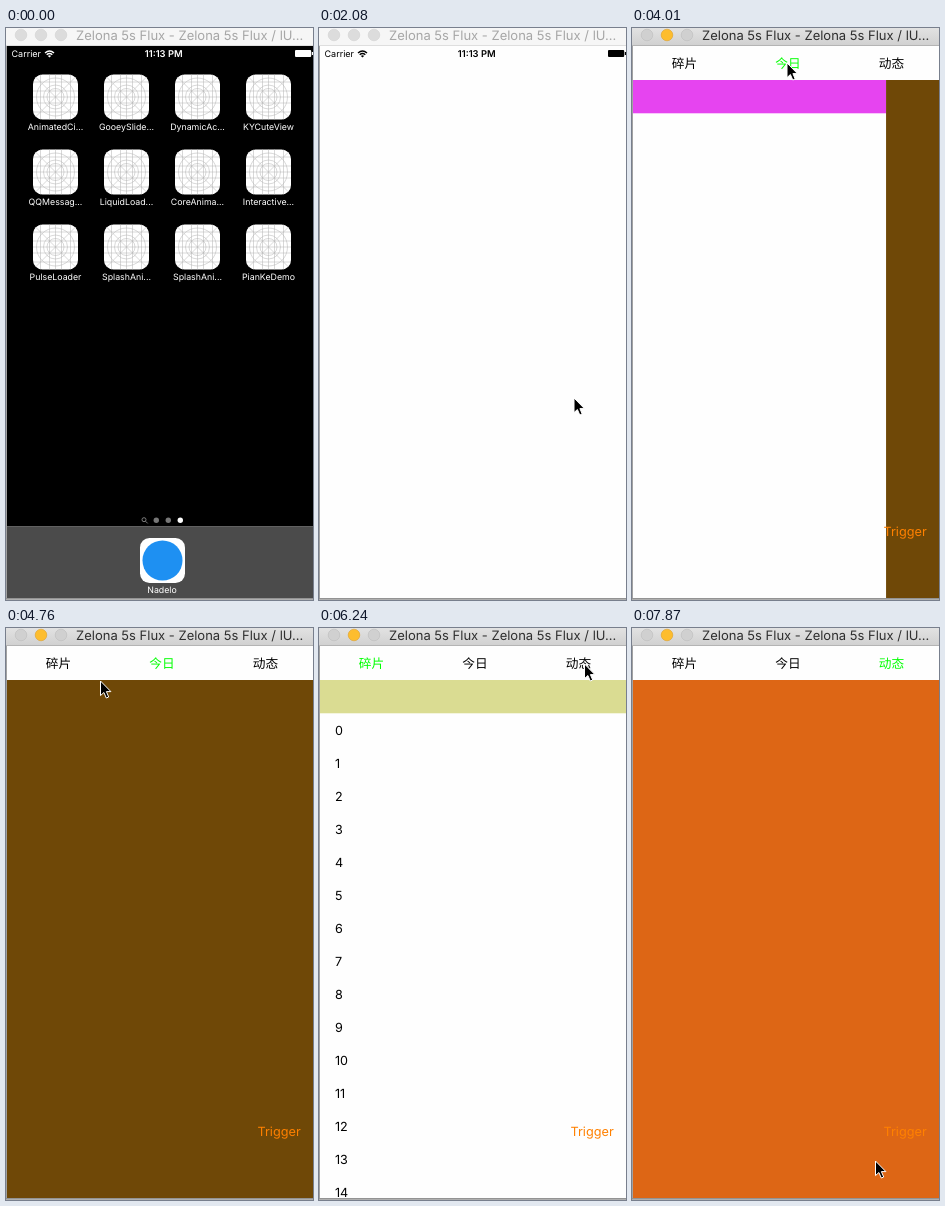
An HTML page for the animation above (8 s loop, 307 px wide and 572 px high).

```html
<!DOCTYPE html>
<html lang="zh-CN">
<head>
<meta charset="utf-8">
<style>
html, body { margin: 0; height: 100%; overflow: hidden; background: #fff }
svg { display: block; width: 307px; height: 572px; font-family: Inter, Roboto, sans-serif; text-rendering: geometricPrecision }
.tabs { font: 12.7px "Noto Sans CJK SC", "Noto Sans CJK", sans-serif }
.mid { text-anchor: middle }
</style>
</head>
<body>
<svg viewBox="0 0 307 572">
  <defs>
    <linearGradient id="bar" x2="0" y2="1"><stop stop-color="#e2e2e2"/><stop offset="1" stop-color="#d0d0d0"/></linearGradient>
    <linearGradient id="shade" x2="0" y2="1"><stop stop-color="#858585"/><stop offset="1" stop-color="#bdbdbd"/></linearGradient>
    <clipPath id="screen"><path d="M1 18H307V570H1Z"/></clipPath>
    <g id="tile">
      <rect width="45" height="45" rx="9.5" fill="#fff"/>
      <g fill="none" stroke="#b0b0b0" stroke-width=".5">
        <path d="M7.5 0V45M16.5 0V45M22.5 0V45M28.5 0V45M37.5 0V45M0 7.5H45M0 16.5H45M0 22.5H45M0 28.5H45M0 37.5H45M2.5 2.5L42.5 42.5M42.5 2.5L2.5 42.5"/>
        <circle cx="22.5" cy="22.5" r="19"/><circle cx="22.5" cy="22.5" r="12"/><circle cx="22.5" cy="22.5" r="8.5"/>
      </g>
    </g>
  </defs>
  <rect width="307" height="572" fill="#a2a2a2"/>
  <rect y="570" width="307" height="2" fill="url(#shade)"/>

  <g clip-path="url(#screen)">
    <g id="phone">
      <rect y="18" width="307" height="554"/>
      <g id="home">
        <g id="apps" class="mid" font-size="8.8" fill="#fff"></g>
        <g fill="none" stroke="#888" stroke-width=".9"><circle cx="138" cy="491.7" r="2"/><path d="M139.5 493.2L141.7 495.4"/></g>
        <g fill="#777"><circle cx="150.3" cy="492.3" r="2.7"/><circle cx="162.3" cy="492.3" r="2.7"/><circle cx="174.3" cy="492.3" r="2.7" fill="#fff"/></g>
        <rect y="498" width="308" height="74" fill="#4b4b4b"/>
        <rect y="498" width="308" height=".7" fill="#6a6a6a"/>
        <rect x="134" y="510" width="45" height="45" rx="9.5" fill="#fff"/>
        <circle cx="156.5" cy="532.5" r="20" fill="#1e90f2"/>
        <text class="mid" x="156" y="565" font-size="8.8" fill="#fff">Nadelo</text>
      </g>
      <rect id="launch" fill="#fefefe"/>
      <g id="status" fill="currentColor">
        <text x="5.5" y="29" font-size="9">Carrier</text>
        <g fill="none" stroke="currentColor" stroke-width="1.4"><path d="M39 24.9Q43.5 20.9 48 24.9M40.7 26.8Q43.5 24.4 46.3 26.8"/></g>
        <path d="M41.9 27.9Q43.5 26.7 45.1 27.9L43.5 29.5Z"/>
        <text class="mid" x="157.7" y="29" font-size="9.4" font-weight="600">11:13 PM</text>
        <rect x="289" y="22" width="16.2" height="7" rx="1"/><rect x="305.8" y="24" width="1.2" height="3"/>
      </g>
    </g>
    <g id="app">
      <rect y="18" width="307" height="554" fill="#fefefe"/>
      <g id="pages">
        <rect id="head" x="1" y="52" width="306" height="33.3"/>
        <g id="rows" font-size="12.6"></g>
        <rect x="307" y="52" width="306" height="520" fill="#6f4807"/>
        <rect x="613" y="52" width="306" height="520" fill="#dd6615"/>
      </g>
      <text x="251.5" y="508.3" font-size="12.7" fill="#ff8000">Trigger</text>
      <g id="tabs" class="tabs mid"><text x="52.5" y="39.8">碎片</text><text x="156" y="39.8">今日</text><text x="259.5" y="39.8">动态</text></g>
    </g>
  </g>

  <rect id="titleBar" width="307" height="18"/>
  <rect id="titleLine" y="17" width="307" height="1"/>
  <g id="lights" stroke-width=".6"><circle cx="15" cy="7" r="5.8"/><circle cx="35" cy="7" r="5.8"/><circle cx="55" cy="7" r="5.8"/></g>
  <text id="title" x="70" y="11.8" font-size="13">Zelona 5s Flux - Zelona 5s Flux / lU...</text>
  <path id="cursor" d="M0 -1V13.6L3.4 10.5L5.8 16L8.2 15L5.9 9.6H10.4Z" stroke="#fff" stroke-width="1"/>
</svg>
<script>
const LOOP = 8000, START = 1490, STEP = 148.4;
const $ = id => document.getElementById(id);
const set = (el, attrs) => { for (const a in attrs) el.setAttribute(a, attrs[a]); };
const show = (id, on) => set($(id), { visibility: on ? 'visible' : 'hidden' });
const lerp = (a, b, p) => a + (b - a) * p;

const names = ['AnimatedCi...', 'GooeySlide...', 'DynamicAc...', 'KYCuteView',
  'QQMessag...', 'LiquidLoad...', 'CoreAnima...', 'Interactive...',
  'PulseLoader', 'SplashAni...', 'SplashAni...', 'PianKeDemo'];
$('apps').innerHTML = names.map((name, i) => {
  const x = 27 + i % 4 * 71, y = 46.5 + (i >> 2) * 75;
  return `<use href="#tile" x="${x}" y="${y}"/><text x="${x + 22.5}" y="${y + 55}">${name}</text>`;
}).join('');
$('rows').innerHTML = Array.from({ length: 15 }, (_, i) =>
  `<text x="16" y="${106.6 + 33 * i}">${i}</text>`).join('');

// Pointer path: step, x, y
const path = [[4, 255, 371], [7, 228, 367], [8, 216, 332], [9, 196, 262], [10, 170, 190], [11, 145, 125],
  [12, 130, 76], [13, 140, 48], [14, 155, 36], [18, 155, 36], [20, 111, 72], [22, 94.5, 54], [24, 45, 38],
  [28, 45, 38], [32, 265.5, 37], [36, 265.5, 37], [40, 76, 120], [43, 243.5, 534]];

// Tab taps: step, tab
const taps = [[-1, 0], [17, 1], [26, 0], [34, 2]];
const glide = [.173, .88, 1];

function pointer(k) {
  const i = path.findIndex(p => p[0] > k);
  if (i < 0) return path[path.length - 1].slice(1);
  const a = path[Math.max(i - 1, 0)], b = path[i], p = Math.max(0, (k - a[0]) / (b[0] - a[0] || 1));
  return [lerp(a[1], b[1], p), lerp(a[2], b[2], p)];
}

function drawLaunch(k) {
  const u = k < 0 ? 0 : Math.min(1, (k + .262) / 4), p = u * u * (3 - 2 * u), s = 1 + 5.8 * p;
  set($('home'), { transform: `translate(283 214) scale(${s}) translate(-283 -214)` });
  set($('launch'), {
    x: lerp(240, 1, p), y: lerp(196.5, 18, p), width: lerp(45, 306, p), height: lerp(45, 552, p),
    rx: lerp(9.5, 0, p), opacity: k < 1 ? 0 : Math.min(1, p * 2.5)
  });
  $('status').style.color = p > .8 ? '#000' : '#fff';
}

function drawApp(k) {
  const n = taps.filter(t => t[0] <= k).length - 1, [at, tab] = taps[n];
  const from = n ? taps[n - 1][1] : 0, p = n ? glide[Math.min(k - at, 2)] : 1;
  set($('pages'), { transform: `translate(${-306 * lerp(from, tab, p)} 0)` });
  set($('head'), { fill: n < 2 ? '#e644f0' : '#dadc92' });
  [...$('tabs').children].forEach((t, i) => set(t, { fill: i === tab ? '#0f0' : '#000' }));
}

function drawWindow(active) {
  set($('titleBar'), { fill: active ? 'url(#bar)' : '#f6f6f6' });
  set($('titleLine'), { fill: active ? '#b4b4b4' : '#dedede' });
  set($('title'), { fill: active ? '#2e2e2e' : '#a6a6a6' });
  [...$('lights').children].forEach((c, i) => set(c, active && i === 1
    ? { fill: '#fdbd2e', stroke: '#e0a028' }
    : { fill: active ? '#d0d0d0' : '#dcdcdc', stroke: active ? '#bcbcbc' : '#d2d2d2' }));
}

function draw(k) {
  const open = k >= 6;
  show('phone', !open);
  show('app', open);
  show('cursor', k >= 4);
  drawLaunch(k);
  drawApp(k);
  drawWindow(open);
  set($('cursor'), { transform: `translate(${pointer(k)})` });
}

let last;
function tick() {
  const t = performance.now() % LOOP;
  // The screen advances in even steps once the launch begins
  const k = t < START ? -1 : Math.min(43, Math.floor((t - START + 10) / STEP));
  if (k !== last) draw(last = k);
  requestAnimationFrame(tick);
}
tick();
</script>
</body>
</html>
```
